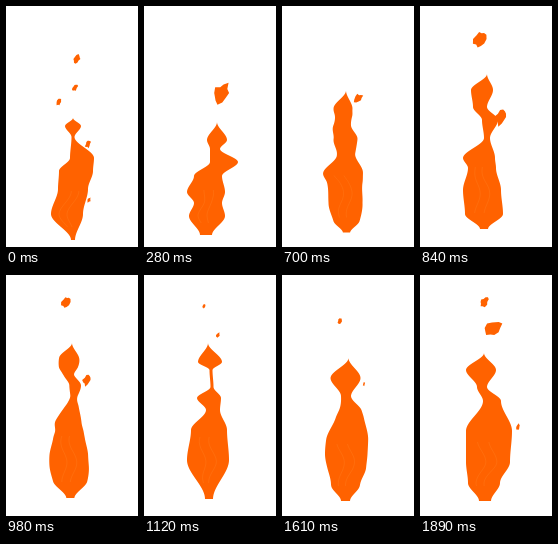
Write an HTML page with a canvas that moves like this. It is 132x241 px and loops after 1960 ms.

```html
<!DOCTYPE html>
<html lang="en">
<head>
<meta charset="utf-8">
<title>Flame</title>
<style>
  html, body { margin: 0; height: 100%; overflow: hidden; background: #fff; }
  canvas { display: block; width: 100vw; height: 100vh; }
</style>
</head>
<body>
<canvas id="stage" width="132" height="241"></canvas>
<script>
const ctx = document.getElementById('stage').getContext('2d');
const TICK = 70, TICKS = 28, FRAMES = 23, ORANGE = '#ff6200';
const poses = [];
const mix = (a, b, k) => a + (b - a) * k;
const ease = k => k * k * (3 - 2 * k);

// body: bulges and necks from tip to foot as [y, center, half width]
// sparks: [x, y, half width, half height]
function pose(at, body, sparks) {
  poses.push({ at, body, sparks, top: body[0][0], foot: body[body.length - 1][0] });
}

pose(0, [[112, 67, 0], [120, 67, 8], [131, 67, 1.5], [152, 76, 12], [165, 70, 17],
  [183, 67, 15], [208, 61, 16], [234, 67, 2]],
  [[71, 53, 4, 5], [69, 82, 3, 4], [53, 96, 3, 4], [82, 138, 3, 5], [83, 194, 2, 3]]);

pose(3, [[116, 73, 0], [134, 73, 10], [143, 71, 5], [156, 80, 14], [170, 64, 14],
  [186, 62, 19], [197, 64, 14], [210, 63, 18], [229, 62, 6]],
  [[77, 87, 9, 12]]);

pose(6, [[101, 61, 0], [121, 60, 8], [128, 62, 8], [152, 57, 16], [164, 61, 15],
  [181, 63, 24], [208, 65, 15], [231, 65, 3]],
  [[76, 104, 9, 9]]);

pose(10, [[68, 67, 0], [84, 62, 11], [101, 60, 7], [114, 70, 8], [132, 67, 3],
  [152, 59, 16], [162, 62, 14], [184, 62, 19], [208, 64, 19], [223, 64, 4]],
  [[60, 33, 7, 10], [81, 111, 7, 10]]);

pose(13, [[68, 64, 0], [87, 66, 12], [95, 67, 1.5], [112, 68, 1.5], [123, 65, 12],
  [135, 69, 7], [155, 65, 18], [185, 64, 21], [224, 65, 4]],
  [[60, 31, 1.5, 3], [74, 60, 2, 3]]);

pose(16, [[88, 69, 0], [111, 66, 15], [130, 66, 5], [152, 64, 17], [186, 60, 20],
  [212, 63, 13], [226, 62, 3]],
  [[58, 64, 5, 6], [82, 127, 2, 5]]);

pose(22, [[78, 64, 0], [95, 61, 15], [112, 62, 5], [126, 72, 9], [156, 69, 23],
  [187, 68, 22], [208, 64, 16], [226, 65, 6]],
  [[64, 27, 5, 6], [73, 53, 9, 9], [98, 152, 2, 4]]);

function random(seed) {
  const v = Math.sin(seed * 127.1) * 43758.5453;
  return v - Math.floor(v);
}

function sample({ body, top, foot }, u) {
  const y = mix(top, foot, u);
  const i = Math.max(1, body.findIndex(p => p[0] >= y));
  const [p, q] = [body[i - 1], body[i]];
  const k = ease((y - p[0]) / (q[0] - p[0]));
  return [mix(p[1], q[1], k), mix(p[2], q[2], k)];
}

// Blend two bodies while their contours drift upwards
function bodyRows(a, b, k) {
  const top = mix(a.top, b.top, k), foot = mix(a.foot, b.foot, k), rows = [];
  for (let y = top; y <= foot; y++) {
    const u = (y - top) / (foot - top), drift = 0.36 * u * (1 - u);
    const p = sample(a, u + drift * k), q = sample(b, u - drift * (1 - k));
    rows.push({ y, x: mix(p[0], q[0], k), w: mix(p[1], q[1], k) });
  }
  return rows;
}

function fill(points) {
  ctx.fillStyle = ORANGE;
  ctx.beginPath();
  points.forEach(([x, y]) => ctx.lineTo(x, y));
  ctx.fill();
}

// A ragged lick leaning to the right
function drawSpark([x, y, w, h], size, rise) {
  const points = [];
  for (let i = 0; i < 12; i++) {
    const a = i * Math.PI / 6, r = size * (0.55 + 0.45 * random(x + i));
    points.push([x + w * r * (Math.cos(a) - 0.4 * Math.sin(a)), y - rise + h * r * Math.sin(a)]);
  }
  fill(points);
}

function drawStreaks(rows) {
  ctx.strokeStyle = 'rgba(255, 140, 50, .25)';
  for (const side of [-0.3, 0.2]) {
    ctx.beginPath();
    rows.slice(rows.length * 0.6, rows.length * 0.9).forEach(({ y, x, w }) =>
      ctx.lineTo(x + w * (side + 0.2 * Math.sin(y / 7)), y));
    ctx.stroke();
  }
}

function draw(frame) {
  const n = poses.findLastIndex(p => p.at <= frame);
  const a = poses[n], b = poses[(n + 1) % poses.length];
  const gap = (b.at || FRAMES) - a.at, step = frame - a.at, k = step / gap;
  const rows = bodyRows(a, b, k);

  ctx.clearRect(0, 0, 132, 241);
  fill([...rows.map(r => [r.x - r.w, r.y]), ...rows.map(r => [r.x + r.w, r.y]).reverse()]);
  drawStreaks(rows);

  // Sparks grow out of nothing, climb and burn away
  const leaving = k < 0.55;
  const size = 1 - 0.9 * Math.min(k, 1 - k);
  const rise = 6 * (leaving ? step : step - gap);
  (leaving ? a : b).sparks.forEach(s => drawSpark(s, size, rise));
}

function play() {
  const tick = Math.floor(performance.now() / TICK) % TICKS;
  // Every sixth tick repeats the picture before it
  draw(Math.floor(tick / 6) * 5 + Math.max(0, tick % 6 - 1));
  requestAnimationFrame(play);
}
play();
</script>
</body>
</html>
```
